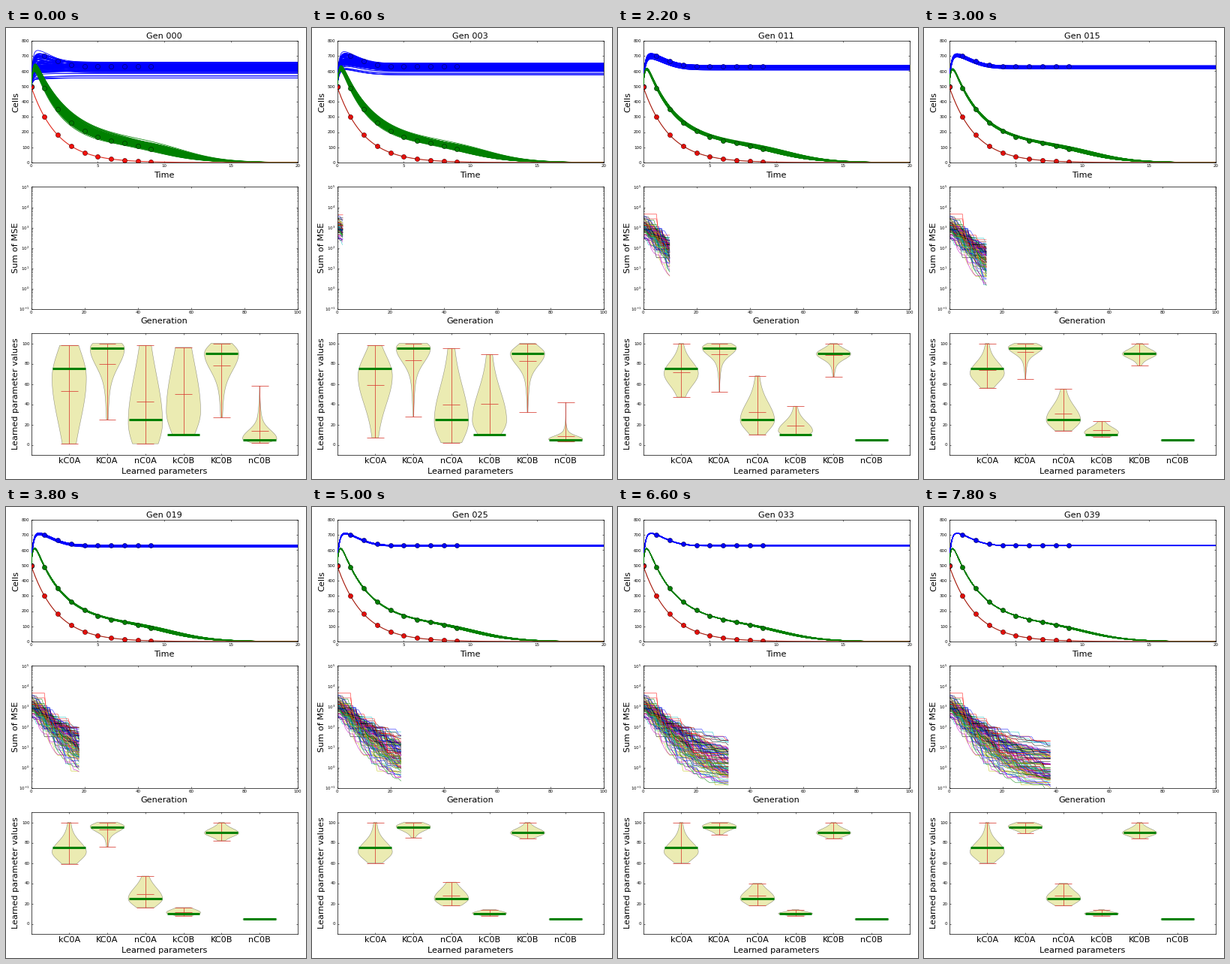
Recreate the animation shown at these times as a matplotlib script. Size 400 by 600 pixels, loop 8000 ms.

```python
import matplotlib.pyplot as plt
import numpy as np
from matplotlib.animation import FuncAnimation
from matplotlib.collections import LineCollection, PolyCollection

W, H = 400, 600
FRAMES, INTERVAL = 40, 200
POP = 100
LEFT, RIGHT = 33.5, 389
MID = (LEFT + RIGHT) / 2
BIG, SMALL = 8.1, 4

rng = np.random.default_rng(12)

fig = plt.figure(figsize=(W / 100, H / 100), dpi=100, facecolor="white")


def panel(top, bottom, xlim, ylim, xticks, scale="linear"):
    ax = fig.add_axes([LEFT / W, 1 - bottom / H, (RIGHT - LEFT) / W, (bottom - top) / H])
    ax.set_yscale(scale)
    ax.set(xlim=xlim, ylim=ylim, xticks=xticks)
    ax.tick_params(which="both", direction="in", top=True, right=True,
                   width=0.4, labelsize=SMALL, pad=1.5)
    ax.tick_params(which="major", length=1.4)
    ax.tick_params(which="minor", length=0.7)
    for spine in ax.spines.values():
        spine.set_linewidth(0.5)
    return ax


def label(x, y, text, rotation=0):
    return fig.text(x / W, 1 - y / H, text, fontsize=BIG, ha="center",
                    va="baseline", rotation=rotation, rotation_mode="anchor")


def add_lines(ax, **style):
    lines = LineCollection([], **style)
    ax.add_collection(lines, autolim=False)
    return lines


def curves(x, rows):
    return [np.column_stack((x, row)) for row in rows]


# --- cell counts over time -------------------------------------------------
cells = panel(17, 179, (0, 20), (0, 800), range(0, 21, 5))
label(MID, 199, "Time")
label(16, 98, "Cells", 90)
title = label(MID, 14.5, "Gen 000")

time = 20 * np.linspace(0, 1, 160) ** 2


def rise_from_500(t, curve, surplus, rise=0.15):
    return curve - surplus * np.exp(-t / rise)


def blue_cells(t, level=630.0, over=93.0, rise=0.15):
    curve = level + over * np.exp(-(t / 2) ** 2)
    return rise_from_500(t, curve, level + over - 500, rise)


def green_cells(t, rate=0.48, tail=120.0, centre=10.2):
    curve = 600 * np.exp(-rate * t) + tail / (1 + np.exp((t - centre) / 1.6))
    return rise_from_500(t, curve, 100 + tail)


def red_cells(t):
    return 500 * np.exp(-0.51 * t)


def column():
    return rng.uniform(-1, 1, (POP, 1))


# Heavy lower tail: a few individuals stray far from the pack.
level_dev = rng.standard_t(4, (POP, 1)).clip(-4, 2.1)
lag = 1.1 - 1.25 * rng.random((POP, 1)) ** 3
rise_dev, rate_dev, tail_dev, centre_dev = (column() for _ in range(4))

samples = np.arange(10)
for func, colour in ((blue_cells, "blue"), (green_cells, "green"), (red_cells, "red")):
    spots = func(samples)
    cells.plot(samples, spots, "o", ms=4.6, mfc=colour, mew=0, zorder=2)
    cells.plot(samples, spots, "o", ms=4.4, mfc="none", mec=(0, 0, 0, 0.65),
               mew=0.45, zorder=5)

blue_lines = add_lines(cells, colors="blue", linewidths=0.6, zorder=3)
green_lines = add_lines(cells, colors="green", linewidths=0.55, zorder=3)
cells.plot(time, red_cells(time), color="#e0281c", lw=0.8, zorder=3)
red_shade, = cells.plot(time, red_cells(time), color="#402010", lw=0.5,
                        alpha=0.55, zorder=4)


def draw_cells(gen):
    spread = np.exp(-gen / 9)
    level = 630 + spread * (17 * level_dev - 6)
    over = 93 * (1 - lag * np.exp(-gen / 5))
    rise = 0.15 * (1 + 0.6 * spread * rise_dev)
    blue_lines.set_segments(curves(time, blue_cells(time, level, over, rise)))

    rate = 0.48 * (1 - spread * (0.07 + 0.15 * rate_dev))
    tail = 120 * (1 + spread * (0.06 + 0.2 * tail_dev))
    centre = 10.2 + spread ** 0.3 * (0.3 + centre_dev)
    green_lines.set_segments(curves(time, green_cells(time, rate, tail, centre)))
    red_shade.set_alpha(0.55 * (1 - np.exp(-gen / 2)))


# --- error of every individual ---------------------------------------------
error = panel(211.5, 373.5, (0, 100), (0.1, 1e5), range(0, 101, 20), "log")
label(MID, 393, "Generation")
label(16, 292.5, "Sum of MSE", 90)


def error_history():
    """Staircases in log10 units, each falling to its own floor at its own pace."""
    gens = np.arange(FRAMES)
    first = rng.normal(3.0, 0.25, (POP, 1)).clip(2.4, 3.5)
    floor = -1 + 2.6 * rng.beta(1, 2.2, (POP, 1))
    pace = rng.uniform(11, 23, (POP, 1))
    goal = floor + (first - floor) * np.exp(-(gens / pace) ** 1.3)
    goal += rng.normal(0, 0.08, goal.shape)
    moved = rng.random(goal.shape) < 0.5
    moved[:, 0] = True
    return 10 ** np.minimum.accumulate(np.where(moved, goal, np.inf), axis=1)


history = error_history()
error_lines = add_lines(error, colors=["b", "g", "r", "c", "m", "y", "k"],
                        linewidths=0.4, alpha=0.85)


def draw_error(gen):
    error_lines.set_segments(curves(np.arange(gen), history[:, :gen]) if gen > 1 else [])


# --- learned parameters ----------------------------------------------------
class Param:
    """Every pair holds a first and a last value; settle is in generations."""

    def __init__(self, name, true, settle, low, high, peak, below, above):
        self.name, self.true, self.settle = name, true, settle
        self.low, self.high = low, high
        self.peak, self.below, self.above = peak, below, above

    def extent(self, gen):
        fade = np.exp(-(gen / self.settle) ** 2)
        return [round(end + (start - end) * fade)
                for start, end in (self.low, self.high)]

    def shape(self, gen):
        fade = np.exp(-gen / (0.6 * self.settle))
        peak, below, above = (end + (start - end) * fade for start, end in
                              (self.peak, self.below, self.above))
        y = np.linspace(*self.extent(gen), 100)
        d = (y - peak) / np.where(y < peak, below, above)
        w = 0.8 * np.exp(-d ** 2 / 2) + 0.2 * np.exp(-(d / 2.5) ** 2 / 2)
        return y, 0.45 * w / w.max()


params = [
    Param("kC0A", 75, 9, (1, 60), (98, 100), (66, 71), (42, 7), (26, 9)),
    Param("KC0A", 95, 15, (25, 89), (100, 100), (95, 96), (17, 3.2), (8, 3)),
    Param("nC0A", 25, 13, (1, 18), (98, 40), (22, 25), (25, 5), (45, 7)),
    Param("kC0B", 10, 10, (10, 8), (96, 14), (33, 10), (22, 1.2), (45, 1.5)),
    Param("KC0B", 90, 10, (27, 84), (100, 100), (90, 89.5), (16, 3), (9, 4)),
    Param("nC0B", 5, 5, (2, 5), (58, 5), (6, 5), (3, 0.5), (8, 0.5)),
]

learned = panel(406, 568, (0, 7), (-10, 110), range(1, 7))
learned.set_xticklabels([])
learned.set_yticks(range(0, 101, 20))
label(MID, 593, "Learned parameters")
label(16, 487, "Learned parameter values", 90)
for i, p in enumerate(params, 1):
    label(LEFT + i * (RIGHT - LEFT) / 7, 579, p.name)
    learned.plot([i - 0.43, i + 0.43], [p.true] * 2, color="green", lw=2.2,
                 solid_capstyle="butt", zorder=4)

bodies = PolyCollection([], facecolors=[(0.75, 0.75, 0, 0.3)],
                        edgecolors=[(0, 0, 0, 0.4)], linewidths=0.4, zorder=2)
learned.add_collection(bodies)
bars = add_lines(learned, colors="#d83c32", linewidths=0.55, zorder=3)


def draw_params(gen):
    outlines, lines = [], []
    for i, p in enumerate(params, 1):
        y, w = p.shape(gen)
        outlines.append(np.column_stack((np.r_[i - w, i + w[::-1]], np.r_[y, y[::-1]])))
        lines.append([(i, y[0]), (i, y[-1])])
        for v in (y[0], np.average(y, weights=w), y[-1]):
            lines.append([(i - 0.225, v), (i + 0.225, v)])
    bodies.set_verts(outlines)
    bars.set_segments(lines)


def update(gen):
    title.set_text(f"Gen {gen:03d}")
    draw_cells(gen)
    draw_error(gen)
    draw_params(gen)
    return []


anim = FuncAnimation(fig, update, frames=FRAMES, interval=INTERVAL,
                     init_func=lambda: update(0), repeat=True, repeat_delay=0)

plt.show()
```
